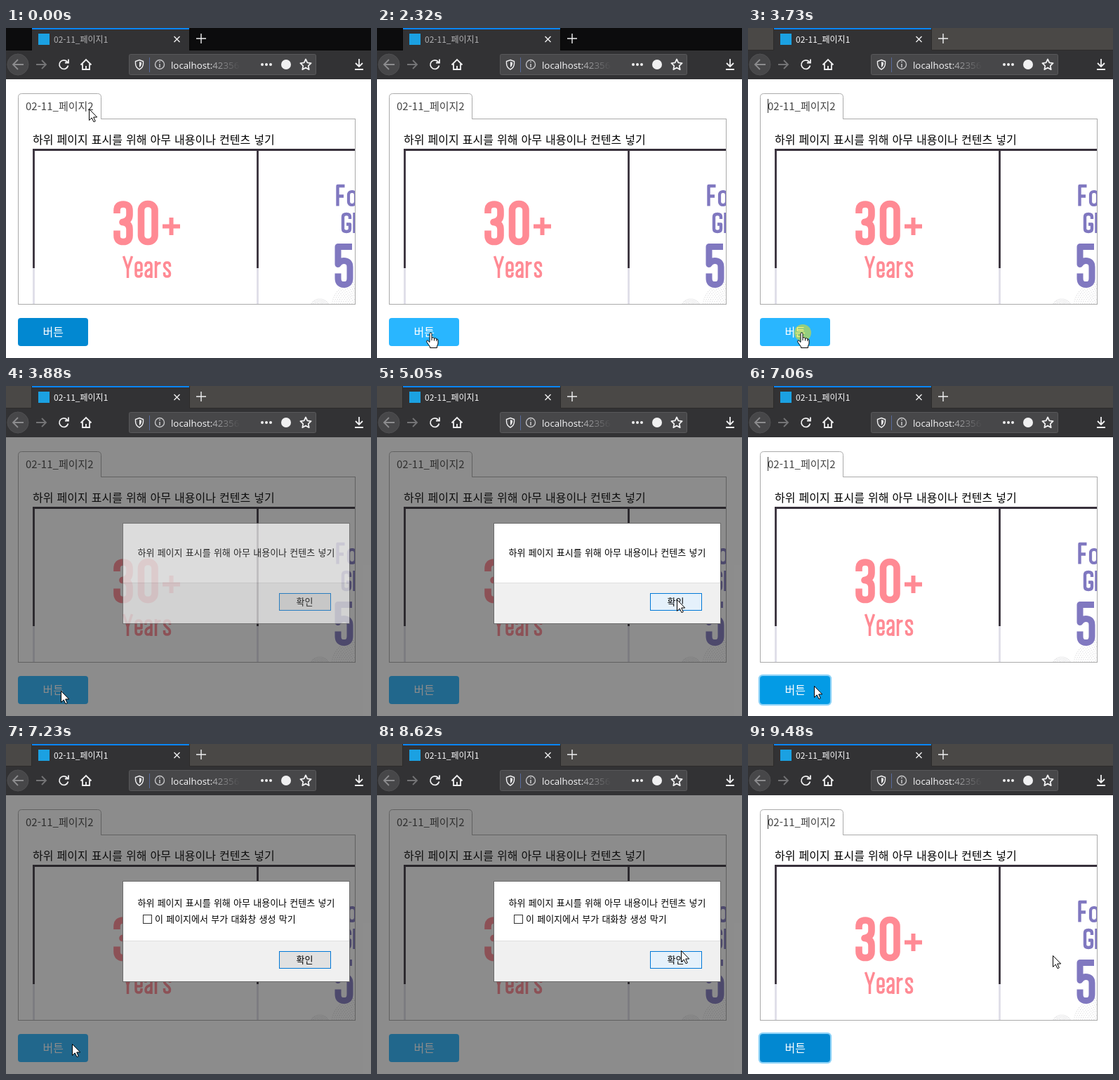
An HTML page that plays this animation: 520x470 px, repeating every 9860 ms.

```html
<!DOCTYPE html>
<html lang="ko">
<head>
<meta charset="utf-8">
<title>02-11_페이지1</title>
<style>
  html, body { margin: 0; width: 520px; height: 470px; overflow: hidden; background: #fff; }
  svg { display: block; }
  text { font-family: "Noto Sans CJK KR", "Noto Sans CJK JP", "Noto Sans CJK", sans-serif; }
  .line { fill: none; stroke: #f0f0f1; stroke-width: 1.8; }
  .thin { stroke-width: 1.4; }
  .body { font-size: 16px; word-spacing: .6px; }
  .small { font-size: 13px; word-spacing: .6px; }
  .art { fill: none; stroke-linejoin: round; }
</style>
</head>
<body>
<svg width="520" height="470" viewBox="0 0 520 470">
  <defs>
    <linearGradient id="fade" gradientUnits="userSpaceOnUse" x1="296" y1="0" x2="330" y2="0">
      <stop offset="0" stop-color="#b1b1b3"/>
      <stop offset="1" stop-color="#b1b1b3" stop-opacity="0.08"/>
    </linearGradient>
    <clipPath id="view"><rect x="38" y="130" width="459" height="263"/></clipPath>
  </defs>

  <!-- browser chrome -->
  <rect id="strip" width="520" height="32"/>
  <path d="M0 31.500h36.500V0M520 31.500H261.500V0" fill="none" stroke="#000" stroke-opacity=".4"/>
  <rect y="32" width="520" height="41" fill="#323234"/>
  <rect x="37" width="224" height="32" fill="#323234"/>
  <rect x="37" width="224" height="2" fill="#0a84ff"/>
  <rect x="46" y="8" width="16" height="16" fill="#1ba1e2"/>
  <text id="title" x="68" y="21" font-size="12">02-11_페이지1</text>
  <path class="line thin" d="M239.500 12l8 8m0-8l-8 8M271 15h14m-7-7v14"/>

  <circle cx="17" cy="52" r="15" fill="#474749" stroke="#505052"/>
  <path class="line" style="stroke:#8c8c8e" d="M25 52H10m7-7l-7 7 7 7"/>
  <path class="line" style="stroke:#747476" d="M43 52h14m-6-6l6 6-6 6"/>
  <path class="line" d="M87.500 48.500a6.300 6.300 0 1 0 1 5M89 44.500v5h-5"/>
  <path class="line" d="M106.500 52.500l7.500-7.500 7.500 7.500M109 51v8h10v-8M114 59v-5"/>

  <rect x="175.500" y="37.500" width="266" height="29" rx="2" fill="#474749" stroke="#59595b"/>
  <path class="line thin" d="M190 45.500l5.500 2v3q0 6-5.500 8.500-5.500-2.500-5.500-8.500v-3z"/>
  <path d="M190 48v8q3-2 3-6v-1z" fill="#f0f0f1"/>
  <path d="M204.500 42v21" stroke="#56699a"/>
  <circle class="line thin" style="stroke:#c4c4c6" cx="219" cy="52" r="6.500"/>
  <path d="M219 51v5m0-8.500v1.700" stroke="#c4c4c6" stroke-width="1.600"/>
  <text x="235" y="58" font-size="13.300" fill="#f9f9fa" style="font-family:'Open Sans','Noto Sans',sans-serif">localhost:<tspan fill="url(#fade)">42356</tspan></text>
  <g fill="#f0f0f1">
    <circle cx="365" cy="52" r="2"/><circle cx="371" cy="52" r="2"/><circle cx="377" cy="52" r="2"/>
    <circle cx="399" cy="52" r="7"/>
  </g>
  <path class="line" stroke-linejoin="round" d="M427 44.500l2.300 4.900 5.300.7-3.900 3.700 1 5.300-4.700-2.600-4.700 2.600 1-5.300-3.900-3.700 5.300-.7z"/>
  <path class="line" d="M503 44v11m-5-5l5 5 5-5M497 59h12"/>

  <!-- page -->
  <rect y="73" width="520" height="397" fill="#fff"/>
  <rect x="17.500" y="129.500" width="480" height="264" fill="#fff" stroke="#aaa"/>
  <path d="M17.500 130V98.500q0-5 5-5h108q5 0 5 5v31" fill="#fff" stroke="#aaa"/>
  <path d="M18 129.500h117" stroke="#fff"/>
  <text x="28" y="116.500" font-size="15" fill="#444">02-11_페이지2</text>
  <path id="caret" d="M28.500 101v20" stroke="#333"/>

  <g clip-path="url(#view)">
    <text class="body" x="38" y="165">하위 페이지 표시를 위해 아무 내용이나 컨텐츠 넣기</text>
    <path d="M38 173.500h460M39.500 172v170M358.500 172v170" stroke="#37303b" stroke-width="2.800"/>
    <path d="M39.500 342v52M358.500 342v52" stroke="#dfdee8" stroke-width="2.800"/>
    <g class="art" stroke="#ff8a94" role="img" aria-label="30+ Years">
      <path stroke-width="9.600" d="M158 264v-4q0-9 9-9t9 9v6q0 9-10 10.500 10 1 10 10v9q0 9-9 9t-9-9v-7"/>
      <rect stroke-width="9.600" x="192.500" y="250.500" width="19.500" height="54" rx="9"/>
      <path stroke-width="6" d="M223 282.500h25M235.500 270v25"/>
      <path stroke-width="3.500" d="M167.500 325l6 18 6-18M173.500 343v13M185 345h8v-7q0-4-4-4t-4 4v12q0 4 4 4t4-4v-2
        M199 340v-2q0-4 4-4t4 4v18M207 343q-8 2-8 7 0 4 3 4 4 0 5-4M213.500 332v24M213.500 340q1.500-6 7-5
        M233.500 340v-2q0-4-4-4t-4 4q0 3 4 6t4 6q0 4-4 4t-4-4v-2"/>
    </g>
    <g id="dots" fill="#d3d3d6"></g>
    <g class="art" stroke="#8078c0" role="img" aria-label="Fo Gl 5">
      <path stroke-width="4.400" d="M472.500 253.500v-28.500h10M472.500 239.500h8.500M490 272v-3q0-4-5-4t-5 4v17q0 4 5 4t5-4v-6.500h-5M496.500 263v29"/>
      <rect stroke-width="4.200" x="488" y="233" width="10" height="19" rx="4.500"/>
      <path stroke-width="9" d="M493 311.500h-20v25q3-5 8-5 9 0 9 9v16q0 9-8.500 9t-8.500-9v-7"/>
    </g>
  </g>

  <rect id="ring" x="16" y="412" width="102" height="42" rx="5" fill="none" stroke="#8ed3f8" stroke-width="2.500"/>
  <rect id="button" x="17" y="413" width="100" height="40" rx="4"/>
  <text x="52.500" y="438.500" font-size="16" fill="#fff">버튼</text>

  <!-- alert -->
  <rect id="dim" y="73" width="520" height="397" fill="#1a1a1a" fill-opacity=".5"/>
  <g id="dialog">
    <rect x="166.500" y="195.500" width="323" height="143" fill="#fff" stroke="#6b6b6b"/>
    <rect x="167" y="280" width="322" height="58" fill="#f0f0f0"/>
    <path d="M167 280.500h322" stroke="#dfdfdf"/>
    <text id="message" class="small" x="187.500" y="242">하위 페이지 표시를 위해 아무 내용이나 컨텐츠 넣기</text>
    <g id="option">
      <rect x="195.500" y="243.500" width="12" height="12" fill="#fff" stroke="#333"/>
      <text class="small" x="212" y="254">이 페이지에서 부가 대화창 생성 막기</text>
    </g>
    <rect id="ok" x="389.500" y="295.500" width="73" height="24"/>
    <text class="small" x="413.500" y="312">확인</text>
  </g>

  <g id="pointer">
    <circle id="click" r="12" fill="#ffe600" fill-opacity=".5"/>
    <path id="arrow" d="M.5.500v16l3.700-3.500 2.800 5.700 2.300-1-2.600-5.700h5z" fill="#fff" stroke="#000"/>
    <g id="hand" transform="translate(-1.500 0)" fill="#fff" stroke="#000">
      <path d="M-1.500 1.500Q-1.500 0 0 0t1.500 1.500V7Q4 6 5 8q2.500-1 3.300 1 2.200-.5 2.200 2v4q0 2-1.500 4v2.500H-1V20l-4.500-6.500q-1-2.500 1-2.800l3 2.800z"/>
      <path d="M1.500 7v4M5 8v3.500M8.300 9v3" fill="none"/>
    </g>
  </g>
</svg>
<script>
const LOOP = 9860;
const $ = id => document.getElementById(id);
const BASE = '#0288d1', MID = '#039be5', HOVER = '#29b6ff';
const PLAIN = '#e1e1e1', LIT = '#e5f1fb', PRESSED = '#cce4f7';

// start, end, step count, target x, y
const moves = [
  [70, 230, 3, 116, 111], [310, 390, 2, 116, 113], [1400, 1710, 5, 77, 352],
  [1940, 1940, 1, 77, 359], [2090, 2320, 4, 78, 434], [4350, 4750, 6, 429, 295],
  [5050, 5050, 1, 427, 304], [5910, 6520, 9, 94, 427], [8070, 8620, 8, 433, 294],
  [8700, 8700, 1, 434, 292], [8850, 9000, 3, 434, 301]
];
const buttonFill = [
  [0, BASE], [2240, MID], [2320, HOVER], [3800, MID], [3880, HOVER], [5910, MID], [5990, BASE],
  [6440, MID], [6520, HOVER], [7060, MID], [7140, HOVER], [9320, MID], [9400, BASE]
];
const okFill = [
  [0, PLAIN], [4670, LIT], [5760, PRESSED], [5910, PLAIN],
  [8540, LIT], [8700, PLAIN], [8930, LIT], [9170, PRESSED]
];
const dialogAlpha = [[0, 0], [3880, .7], [3960, 1], [5910, 0], [7140, .7], [7230, 1], [9320, 0]];
const handSpans = [[2240, 3880], [6440, 7060]];
const clickSpans = [[3730, 3880], [5760, 5910], [6910, 7060], [9170, 9320]];

const pick = (table, t) => table.reduce((value, [at, next]) => t >= at ? next : value, table[0][1]);
const within = (spans, t) => spans.some(([a, b]) => t >= a && t < b);
const ease = p => (1 - Math.cos(Math.PI * p)) / 2;
const set = (id, name, value) => $(id).setAttribute(name, value);
const show = (id, on) => { $(id).style.display = on ? '' : 'none'; };

function pointerAt(t) {
  let x = 118, y = 115;
  for (const [start, end, steps, tx, ty] of moves) {
    if (t < start) break;
    const gap = steps > 1 ? (end - start) / (steps - 1) : 1;
    const step = Math.min(steps, Math.floor((t - start) / gap + .001) + 1);
    const p = ease(step / steps);
    x += (tx - x) * p;
    y += (ty - y) * p;
  }
  return [Math.round(x), Math.round(y)];
}

function render(t) {
  const active = t >= 3730;
  const alpha = pick(dialogAlpha, t);
  const open = alpha > 0;
  const second = t >= 7140;
  const hand = within(handSpans, t);
  const okColor = pick(okFill, t);

  set('strip', 'fill', active ? '#4a4846' : '#0c0c0d');
  set('title', 'fill', active ? '#f9f9fa' : '#b1b1b3');
  show('caret', active && !open);
  show('ring', t >= 3800 && !open);
  set('button', 'fill', pick(buttonFill, t));

  show('dim', open);
  show('dialog', open);
  set('dialog', 'opacity', alpha);
  show('option', second);
  set('message', 'y', second ? 231 : 242);
  set('ok', 'fill', okColor);
  set('ok', 'stroke', okColor === PRESSED ? '#005499' : '#0078d7');

  set('pointer', 'transform', `translate(${pointerAt(t)})`);
  show('click', within(clickSpans, t));
  show('hand', hand);
  show('arrow', !hand);
}

// dotted globes behind the second panel
function globe(cx, cy, radius, gap) {
  let dots = '';
  for (let r = gap; r <= radius; r += gap)
    for (let a = 0; a < Math.PI; a += gap / r) {
      const x = cx - r * Math.cos(a), y = cy - r * Math.sin(a);
      dots += `<circle cx="${x.toFixed(1)}" cy="${y.toFixed(1)}" r=".6"/>`;
    }
  return dots;
}
$('dots').innerHTML = globe(500, 398, 36, 3) + globe(447, 400, 14, 2);

const began = performance.now();
function tick() {
  render((performance.now() - began) % LOOP);
  requestAnimationFrame(tick);
}
tick();
</script>
</body>
</html>
```
